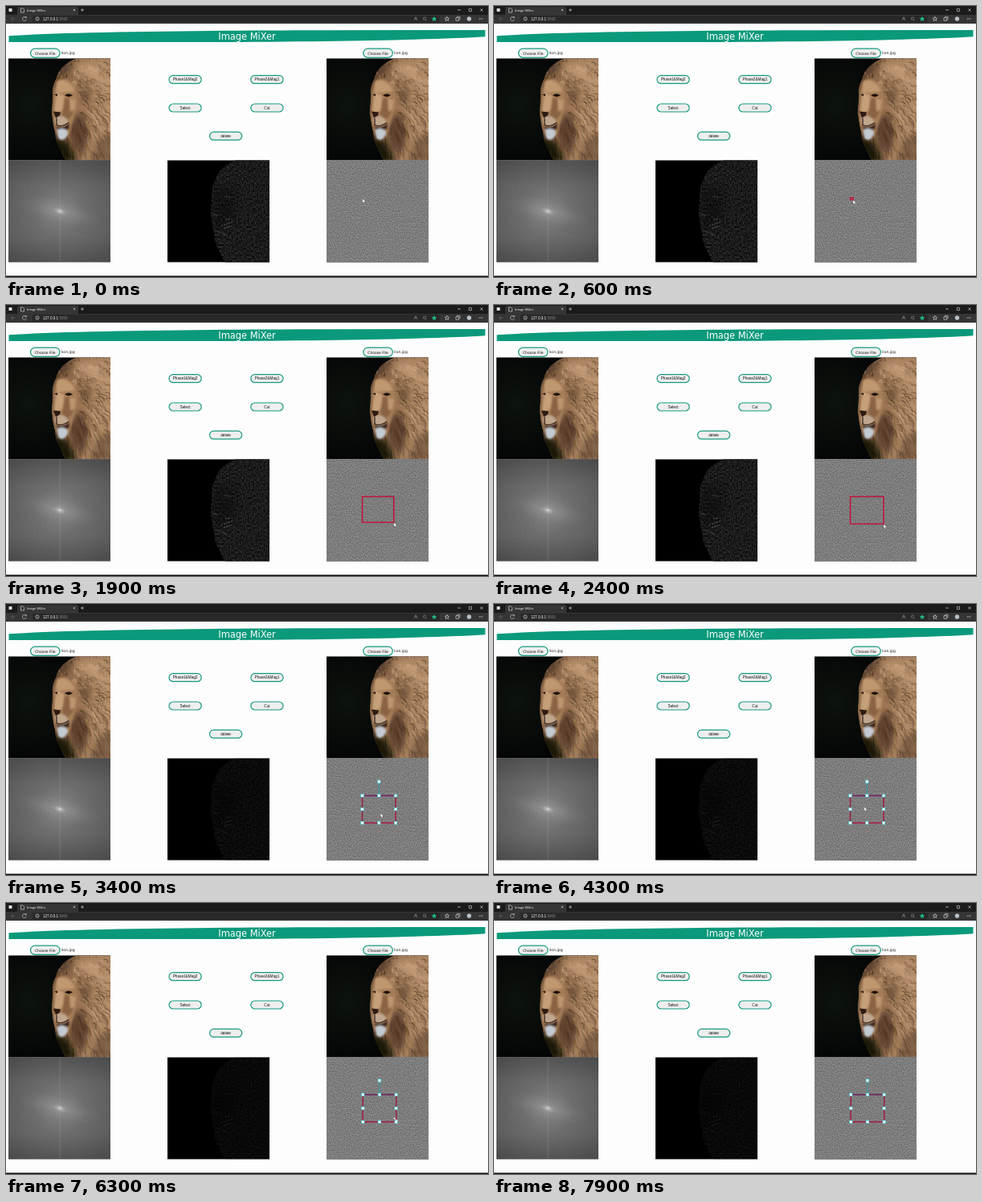
Animation of 600x338 px, one loop 8 s. Source, as an HTML page:

```html
<!DOCTYPE html>
<html lang="en">
<head>
<meta charset="utf-8">
<title>Image MiXer</title>
<style>
  html, body { margin: 0; width: 100%; height: 100%; overflow: hidden; background: #fdfdfe; }
  svg { position: absolute; inset: 0; width: 100%; height: 100%; display: block; }
  text { font-family: "Liberation Sans", Arial, sans-serif; }
  .wide { font-family: "DejaVu Sans", Verdana, sans-serif; }
  .icon { fill: none; stroke: #c8c8c8; stroke-width: .7; }
</style>
</head>
<body>
<svg viewBox="0 0 600 338" preserveAspectRatio="none">
  <defs>
    <path id="mane" d="M84 0C72 5 62 13 59 26C55 33 54 40 55 46C55 56 53 64 54 70C55 78 56 86 58 92C58 100 61 108 64 112C66 118 69 123 72 127.3H127V-.3H84Z"/>
    <clipPath id="inMane"><use href="#mane"/></clipPath>
    <clipPath id="inTile"><path d="M0 -.3H127V127.3H0Z"/></clipPath>
    <filter id="soft" x="-20%" y="-20%" width="140%" height="140%"><feGaussianBlur stdDeviation="1.1"/></filter>
    <filter id="hazy" x="-50%" y="-50%" width="200%" height="200%"><feGaussianBlur stdDeviation="4"/></filter>
    <filter id="phaseNoise" x="0" y="0" width="100%" height="100%" color-interpolation-filters="sRGB">
      <feTurbulence type="fractalNoise" baseFrequency=".85" numOctaves="1" seed="7"/>
      <feColorMatrix values=".45 0 0 0 .265  .45 0 0 0 .265  .45 0 0 0 .265  0 0 0 0 1"/>
    </filter>
    <filter id="faintNoise" x="0" y="0" width="100%" height="100%" color-interpolation-filters="sRGB">
      <feTurbulence type="fractalNoise" baseFrequency=".8" numOctaves="1" seed="3"/>
      <feColorMatrix values="1 0 0 0 0  1 0 0 0 0  1 0 0 0 0  0 0 0 0 .08"/>
    </filter>
    <filter id="edgeNoise" x="0" y="0" width="100%" height="100%" color-interpolation-filters="sRGB">
      <feTurbulence type="fractalNoise" baseFrequency=".6 .4" numOctaves="2" seed="11"/>
      <feColorMatrix values=".3 0 0 0 -.045  .3 0 0 0 -.045  .3 0 0 0 -.045  0 0 0 0 1"/>
      <feComposite in2="SourceGraphic" operator="in"/>
    </filter>
    <linearGradient id="fur" x1="0" y1="0" x2="1" y2=".3">
      <stop offset="0" stop-color="#6a4b33"/><stop offset=".45" stop-color="#9a7453"/><stop offset="1" stop-color="#b18c68"/>
    </linearGradient>
    <radialGradient id="leaves" cx=".2" cy=".45" r=".6">
      <stop offset="0" stop-color="#0d130d"/><stop offset="1" stop-color="#040505"/>
    </radialGradient>
    <radialGradient id="spectrum" r=".72">
      <stop offset="0" stop-color="#858585"/><stop offset=".35" stop-color="#6b6b6b"/><stop offset="1" stop-color="#4f4f4f"/>
    </radialGradient>
    <linearGradient id="dusk" x1="0" y1="0" x2="0" y2="1">
      <stop offset="0" stop-opacity=".14"/><stop offset=".25" stop-opacity="0"/><stop offset=".75" stop-opacity="0"/><stop offset="1" stop-opacity=".14"/>
    </linearGradient>
    <radialGradient id="glow">
      <stop offset="0" stop-color="#fff" stop-opacity=".95"/><stop offset=".2" stop-color="#ddd" stop-opacity=".5"/><stop offset="1" stop-color="#aaa" stop-opacity="0"/>
    </radialGradient>
    <g id="photo" clip-path="url(#inTile)">
      <path d="M0 -.3H127V127.3H0Z" fill="url(#leaves)"/>
      <g clip-path="url(#inMane)">
        <use href="#mane" fill="url(#fur)"/>
        <g id="strands" fill="none" stroke-linecap="round"></g>
        <g filter="url(#hazy)">
          <path d="M52 94L74 103L88 130H50Z" fill="#0c0806" opacity=".9"/>
          <path d="M78 76L92 66L100 96L94 122L82 112L76 96Z" fill="#38200f" opacity=".65"/>
          <path d="M92 30L104 40L98 58L90 52Z" fill="#4c3020" opacity=".6"/>
          <path d="M82 -2L66 10L56 28L62 26L78 12Z" fill="#2b1a0e" opacity=".6"/>
          <path d="M100 132L112 100L130 92V132Z" fill="#3a2515" opacity=".45"/>
          <path d="M80 8L108 6L124 36L104 26Z" fill="#d9b48c" opacity=".5"/>
        </g>
      </g>
      <g filter="url(#soft)">
        <path d="M62 27C74 22 84 30 86 45C87 62 80 78 77 90C73 100 65 101 61 95C58 86 56 77 56 68C56 56 56 44 58 36Z" fill="#a47d58"/>
        <path d="M60 29C68 24 80 31 82 41L72 42L60 43Z" fill="#bf9870"/>
        <path d="M60 43L69 46C69 58 68 63 65 67L57 66Z" fill="#c59f78"/>
        <path d="M70 50C80 48 84 58 79 71L70 79L67 68Z" fill="#8a6444"/>
        <path d="M76 50L84 52L82 64L77 66Z" fill="#bb9670"/>
        <path d="M58 74C67 69 75 74 74 81C69 86 62 85 58 81Z" fill="#c0a68d"/>
        <path d="M59 84C65 87 72 84 76 80L76 88L62 90Z" fill="#3e281b"/>
        <path d="M61 89C67 86 73 88 74 93C72 101 66 104 62 99Z" fill="#c3cad2"/>
      </g>
      <path d="M70 46Q75 42 80 46L75 48Z" fill="#1f120a"/>
      <path d="M57 45L61 44L61 47Z" fill="#25160c"/>
      <path d="M56 66L65 67L64 71L59 74Z" fill="#2d1b13"/>
      <path d="M60 74L60 83Q66 86 75 80" fill="none" stroke="#2e1c13" stroke-width="1.2"/>
    </g>
    <g id="edges" clip-path="url(#inMane)">
      <use href="#mane" fill="#fff" filter="url(#edgeNoise)"/>
      <path d="M60 34L86 36L82 75L62 90L57 62Z" opacity=".3" filter="url(#hazy)"/>
      <path d="M67 81L73 80L82 76M70 85L80 82M72 74L78 73" fill="none" stroke="#999" stroke-width=".9" stroke-dasharray="2 1.2" opacity=".6"/>
      <path d="M70 45L80 46M57 67L63 69M62 89L72 92" fill="none" stroke="#555" stroke-width=".8" opacity=".7"/>
    </g>
  </defs>

  <path d="M0 0H600V338H0Z" fill="#fdfdfe"/>
  <path d="M0 0H600V11H0Z" fill="#1b1b1c"/>
  <path d="M14 11V3Q14 1 16 1H88Q90 1 90 3V11H600V22H0V11Z" fill="#353535"/>
  <rect x="33" y="12" width="507" height="8.6" rx="2" fill="#282828"/>
  <rect x="3.5" y="3" width="4" height="4" rx=".6" fill="#ddd"/>
  <g class="icon">
    <path d="M18.5 2.8H21L22.5 4.3V8H18.5ZM83.8 3.8L86.2 6.2M86.2 3.8L83.8 6.2M95 3V7M93 5H97"/>
    <path d="M562 5H566M576.4 3.4H579.6V6.6H576.4ZM590.4 3.4L593.6 6.6M593.6 3.4L590.4 6.6"/>
    <path d="M11.5 16H6.5L9 13.6M6.5 16L9 18.4" stroke="#666"/>
    <path d="M25 14.5A2.5 2.5 0 1 0 25.3 16.8M25.3 13V14.8H23.5"/>
    <circle cx="39" cy="16" r="2.2"/><path d="M39 15.6V17.3M39 14.5V15"/>
    <path d="M508 17.8L510 13.5L512 17.8M508.8 16.2H511.2" stroke="#888"/>
    <circle cx="521" cy="15.6" r="1.7" stroke="#888"/><path d="M522.2 16.8L523.6 18.2" stroke="#888"/>
    <path d="M549 13.3L549.8 15.2L551.8 15.3L550.2 16.6L550.8 18.5L549 17.4L547.2 18.5L547.8 16.6L546.2 15.3L548.2 15.2Z"/>
    <path d="M560 14.7H563.6V18.3H560ZM561.5 14.7V13.3H565V16.8H563.6"/>
  </g>
  <path d="M533 12.8L534 15L536.3 15.2L534.5 16.7L535.1 19L533 17.8L530.9 19L531.5 16.7L529.7 15.2L532 15Z" fill="#21bd83"/>
  <circle cx="576.5" cy="16" r="2.7" fill="#b9c2c8"/>
  <path d="M588.8 16H593.5" stroke="#ddd" stroke-width="1" stroke-dasharray="1 .8"/>
  <text x="26" y="6.8" font-size="4.1" fill="#eee">Image MiXer</text>
  <text x="46" y="17.7" font-size="4.6" fill="#fff">127.0.0.1<tspan fill="#8a8a8a">:5000</tspan></text>

  <path d="M3.5 37.2C70 32.5 230 30.4 400 30.2L596.5 30V38.2C540 41.8 400 45 220 45H3.5Z" fill="#0b997b"/>
  <text class="wide" x="300" y="41.8" font-size="11.4" fill="#fff" text-anchor="middle">Image MiXer</text>
  <g id="buttons"></g>

  <use href="#photo" x="3" y="65.5"/>
  <use href="#photo" x="399" y="65.5"/>

  <g transform="translate(3 192.5)" clip-path="url(#inTile)">
    <path d="M0 -.3H127V127.3H0Z" fill="url(#spectrum)"/>
    <path d="M0 -.3H127V127.3H0Z" fill="url(#dusk)"/>
    <ellipse cx="64" cy="63.5" rx="52" ry="16" fill="url(#glow)" opacity=".32" transform="rotate(14 64 63.5)"/>
    <path d="M64 0V127" stroke="#b0b0b0" stroke-width=".7" opacity=".4"/>
    <ellipse cx="64" cy="63.5" rx="8" ry="5" fill="url(#glow)" transform="rotate(25 64 63.5)"/>
    <path d="M0 0H127V127H0Z" filter="url(#faintNoise)"/>
  </g>
  <rect x="201" y="192.5" width="127" height="127"/>
  <g id="result"><use href="#edges" x="201" y="192.5"/></g>
  <rect x="399" y="192.5" width="127" height="127" filter="url(#phaseNoise)"/>
  <rect y="336.5" width="600" height="1.5" fill="#0c0c0c"/>
</svg>

<svg viewBox="0 0 600 338" preserveAspectRatio="none">
  <rect id="region" fill="none" stroke="#c0143c" stroke-width="1.5"/>
  <g id="controls"></g>
  <path id="arrow" d="M0 .4V5.4L1.2 4.4L2 6.1L3 5.7L2.2 4H3.8Z" fill="#fff" stroke="#222" stroke-width=".25"/>
  <path id="resizer" d="M-1.8 -1.8L1.8 1.8M-1.8 -.3V-1.8H-.3M1.8 .3V1.8H.3" fill="none" stroke="#fff" stroke-width=".8"/>
</svg>

<script>
const LOOP = 8000;
const $ = id => document.getElementById(id);
const show = (node, on) => node.setAttribute("display", on ? "inline" : "none");

function random(seed) {
  return () => (seed = seed * 16807 % 2147483647) / 2147483647;
}

// Fur radiates from the face and droops with gravity.
function strands(count, seed, colors) {
  const rnd = random(seed);
  let out = "";
  for (let i = 0; i < count; i++) {
    const angle = -1.9 + rnd() * 3.5, radius = 20 + rnd() * 68;
    const x = 70 + Math.cos(angle) * radius, y = 58 + Math.sin(angle) * radius * 1.1;
    const length = 4 + rnd() * 8, dx = Math.cos(angle) * length, dy = Math.sin(angle) * length;
    const color = colors[Math.floor(rnd() * colors.length)];
    out += `<path d="M${x.toFixed(1)} ${y.toFixed(1)}q${(dx * .7).toFixed(1)} ${(dy * .4).toFixed(1)} ${(dx * .8).toFixed(1)} ${(dy * .7 + 7).toFixed(1)}" stroke="${color}" stroke-width="${(.5 + rnd()).toFixed(1)}" opacity=".5"/>`;
  }
  return out;
}
$("strands").innerHTML = strands(650, 42, ["#46301f", "#6d4d34", "#c6a27b", "#d8b791", "#8c6848"]);

function pill(x, y, w, h, label, size, cls = "") {
  return `<rect x="${x}" y="${y}" width="${w}" height="${h}" rx="${h / 2}" fill="#efefef" stroke="#159a7e" stroke-width="1.2"/>
    <text class="${cls}" x="${x + w / 2}" y="${y + h / 2 + 1.7}" font-size="${size}" text-anchor="middle" fill="#111">${label}</text>`;
}
const chooser = x => pill(x, 53.2, 36.5, 11.2, "Choose File", 4.5, "wide") +
  `<text class="wide" x="${x + 38.3}" y="60.4" font-size="4.6" fill="#222">lion.jpg</text>`;
const action = (x, y, label) => pill(x, y, 40.2, 10, label, 4.7);
$("buttons").innerHTML = chooser(30.5) + chooser(444.8) +
  action(203, 86.7, "Phase1&amp;Mag2") + action(304.8, 86.7, "Phase2&amp;Mag1") +
  action(203, 122, "Select") + action(304.8, 122, "Cut") + action(253.5, 157.2, "delete");

const START = { x: 443.5, y: 239 }, SIZE = { w: 41.5, h: 34 };
const handle = (x, y) => `<rect x="${x - 1.8}" y="${y - 1.8}" width="3.6" height="3.6" fill="#fff" stroke="#46c8d2" stroke-width=".7"/>`;
const grid = [0, .5, 1].flatMap(v => [0, .5, 1].map(u => [u, v])).filter(([u, v]) => u !== .5 || v !== .5);
$("controls").innerHTML =
  `<rect width="${SIZE.w}" height="${SIZE.h}" fill="none" stroke="#3a4668" stroke-width=".8" stroke-dasharray="2 1.5" opacity=".75"/>
   <path d="M0 0H${SIZE.w}" stroke="#4a3c7c" stroke-width="1"/>
   <path d="M${SIZE.w / 2} 0V-17.5" stroke="#2b9ca6" stroke-width="1"/>` +
  grid.map(([u, v]) => handle(u * SIZE.w, v * SIZE.h)).join("") + handle(SIZE.w / 2, -17.5);

// Each track holds [time, ...values].
const pointer = [[0, 443.8, 239.8], [400, 443.5, 239], [1300, 470.5, 260], [2100, 485, 273], [2600, 485, 273],
  [3300, 466.5, 261], [4000, 462, 254], [4500, 460, 252], [4900, 462, 252], [5200, 462, 252],
  [5500, 461, 252], [6100, 485, 270], [8000, 485, 270]];
const shift = [[0, 0], [4500, 0], [4900, 2], [5200, 2], [5500, .7], [8000, .7]];

function sample(track, t) {
  const i = track.findIndex(key => key[0] > t);
  const a = track[i - 1], b = track[i];
  const p = (t - a[0]) / (b[0] - a[0]), ease = p * p * (3 - 2 * p);
  return a.slice(1).map((v, k) => v + (b[k + 1] - v) * ease);
}

function draw(t) {
  const [px, py] = sample(pointer, t), [dx] = sample(shift, t);
  const drawing = t < 2600, selected = t >= 2900;
  const region = $("region"), x = START.x + dx;
  const w = drawing ? Math.max(0, px - START.x) : SIZE.w;
  const h = drawing ? Math.max(0, py - START.y) : SIZE.h;
  Object.entries({ x, y: START.y, width: w, height: h }).forEach(([k, v]) => region.setAttribute(k, v));
  show(region, t > 420);
  show($("controls"), selected);
  $("controls").setAttribute("transform", `translate(${x} ${START.y})`);
  $("arrow").setAttribute("transform", `translate(${px} ${py})`);
  $("resizer").setAttribute("transform", `translate(${px} ${py})`);
  show($("arrow"), t < 6050);
  show($("resizer"), t >= 6050 && t < 6900);
  $("result").setAttribute("opacity", t < 2900 ? 1 : t < 5900 ? .42 : .34);
}

const begin = performance.now();
function tick() {
  draw((performance.now() - begin) % LOOP);
  requestAnimationFrame(tick);
}
tick();
</script>
</body>
</html>
```
